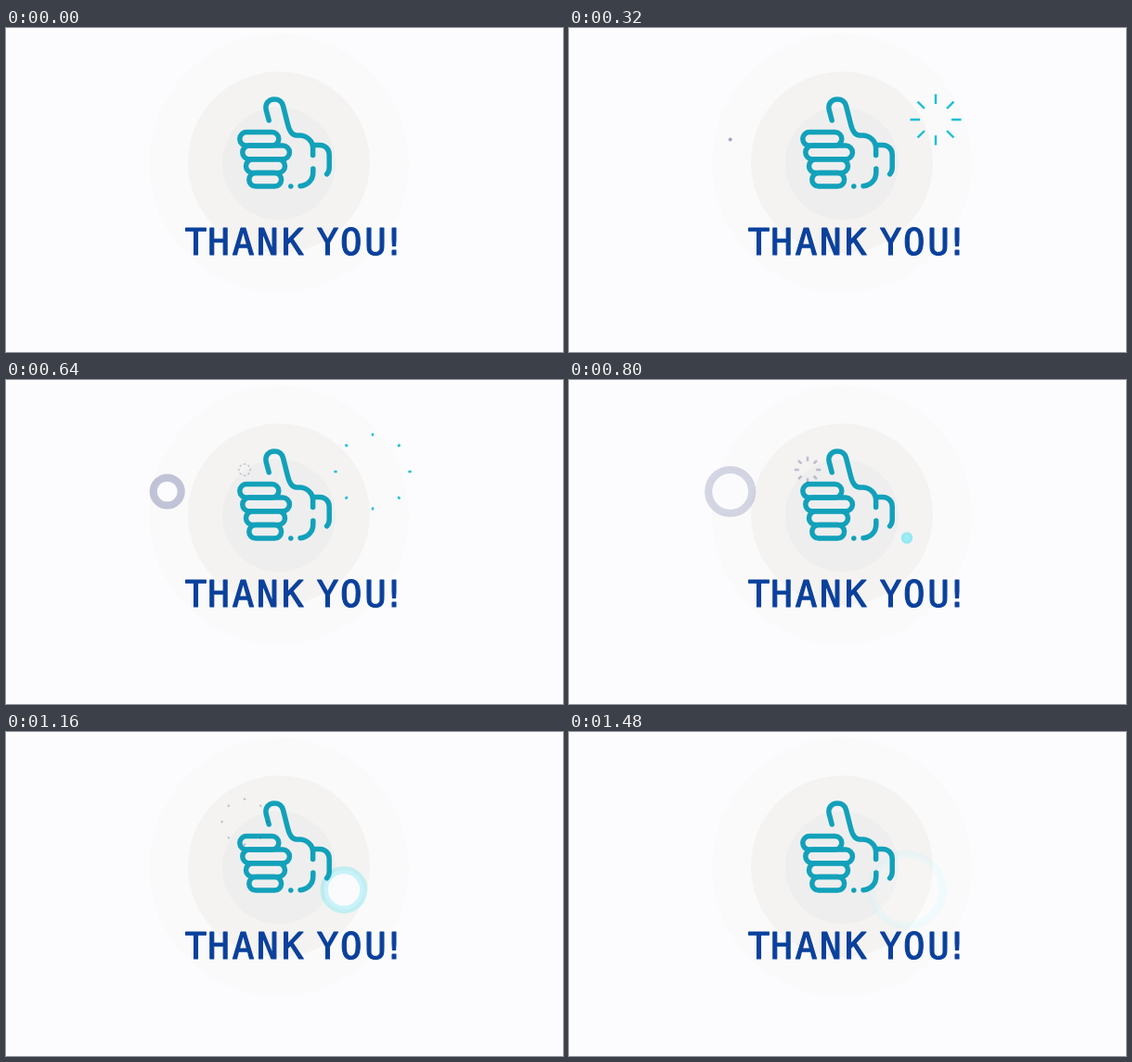
Animation of 600x350 px, one loop 1.6 s. Source, as an HTML page:

```html
<!DOCTYPE html>
<html lang="en">
<head>
<meta charset="utf-8">
<title>Thank you</title>
<style>
  html, body { margin: 0; width: 100%; height: 100%; overflow: hidden; background: #fcfcff; }
  svg { display: block; width: 600px; height: 350px; }
  .hand { fill: none; stroke: #12a1ba; stroke-width: 5.5; stroke-linecap: round; stroke-linejoin: round; }
  text {
    font: 400 39px "DejaVu Sans Mono", monospace;
    text-anchor: middle;
    fill: #0b419c; stroke: #0b419c; stroke-width: 1.2; stroke-linejoin: round;
  }
</style>
</head>
<body>
<svg viewBox="0 0 600 350">
  <rect width="600" height="350" fill="#fcfcff"/>
  <circle cx="294" cy="146" r="140" fill="#fafafb"/>
  <circle cx="294" cy="145" r="98" fill="#f4f3f2"/>
  <circle cx="294" cy="146.5" r="61" fill="#eeeeef"/>

  <circle id="navyRing" cx="173.7" cy="120.5" fill="#fcfcff" stroke="#303a78"/>
  <circle id="cyanRing" cx="364" cy="170.5" fill="#fcfcff" stroke="#12d8ec"/>

  <g class="hand">
    <rect x="251.8" y="112.5" width="42" height="14.6" rx="7.3"/>
    <rect x="254.8" y="127.1" width="50.6" height="14.7" rx="7.35"/>
    <rect x="258.5" y="141.8" width="42" height="14.7" rx="7.35"/>
    <rect x="261.8" y="156.5" width="34.8" height="14.6" rx="7.3"/>
    <path d="M283.2 99.8L280.2 88.5C278.6 82 283 76.9 289 76.9C294 76.9 297.5 79.8 298.6 84.5L303.5 104C305.5 112 308 115.8 313 116H316C324 116 330.6 122 330.6 130V137.5"/>
    <path d="M332 126.5H338C344 126.5 348.2 131 348.2 137V151Q348.2 155 345.6 157.8"/>
    <path d="M330.8 152V156C330.8 164 325 170.2 317 170.7"/>
    <path d="M306.8 171h.01"/>
  </g>

  <path id="tealBurst" transform="translate(395 99)" stroke="#18c0d3" stroke-width="2.4"/>
  <path id="greyBurst" transform="translate(257 97)" stroke="#3a3a70" stroke-opacity=".29" stroke-width="2.5"/>

  <text y="245" x="204.5 229 255.5 281.7 308.7 328 346.5 371.7 398 418">THANK YOU!</text>
</svg>
<script>
const LOOP = 1600, STEP = 40, LAST = 1480;
const $ = id => document.getElementById(id);

// Each row: time, inner radius, outer radius
const RAYS = [
  [0, 3.6, 4.6],
  [120, 9, 11],
  [280, 15.2, 23.2],
  [320, 17, 27.5],
  [480, 26, 36],
  [640, 38.4, 41.6]
];

function sample(table, t) {
  const i = Math.max(1, table.findIndex(row => row[0] >= t));
  const a = table[i - 1], b = table[i];
  const k = (t - a[0]) / (b[0] - a[0]);
  return [1, 2].map(n => a[n] + (b[n] - a[n]) * k);
}

function burst(el, t, scale) {
  const on = t >= 0 && t <= 640;
  el.setAttribute('opacity', on ? Math.min(1, 0.03 + t / 90) : 0);
  if (!on) return;
  const [inner, outer] = sample(RAYS, t);
  let d = '';
  for (let i = 0; i < 8; i++) {
    const c = Math.cos(i * Math.PI / 4) * scale, s = Math.sin(i * Math.PI / 4) * scale;
    d += `M${c * inner} ${s * inner}L${c * outer} ${s * outer}`;
  }
  el.setAttribute('d', d);
}

function ring(el, t) {
  const radius = Math.max(0, 2 + 0.0533 * (t - 320));
  const width = Math.min(radius, 8.2);
  const alpha = radius ? Math.max(0, Math.min(0.44, 0.42 - 0.00056 * (t - 400))) : 0;
  el.setAttribute('r', radius - width / 2);
  el.setAttribute('stroke-width', width);
  el.setAttribute('stroke-opacity', alpha);
  el.setAttribute('fill-opacity', Math.min(1, alpha * 4));
}

const teal = $('tealBurst'), grey = $('greyBurst');
const navy = $('navyRing'), cyan = $('cyanRing');

function draw(now) {
  const t = Math.min(LAST, Math.floor(now % LOOP / STEP) * STEP);
  burst(teal, t, 1);
  burst(grey, t - 520, 0.61);
  ring(navy, t);
  ring(cyan, t - 400);
  requestAnimationFrame(draw);
}
draw(0);
</script>
</body>
</html>
```
